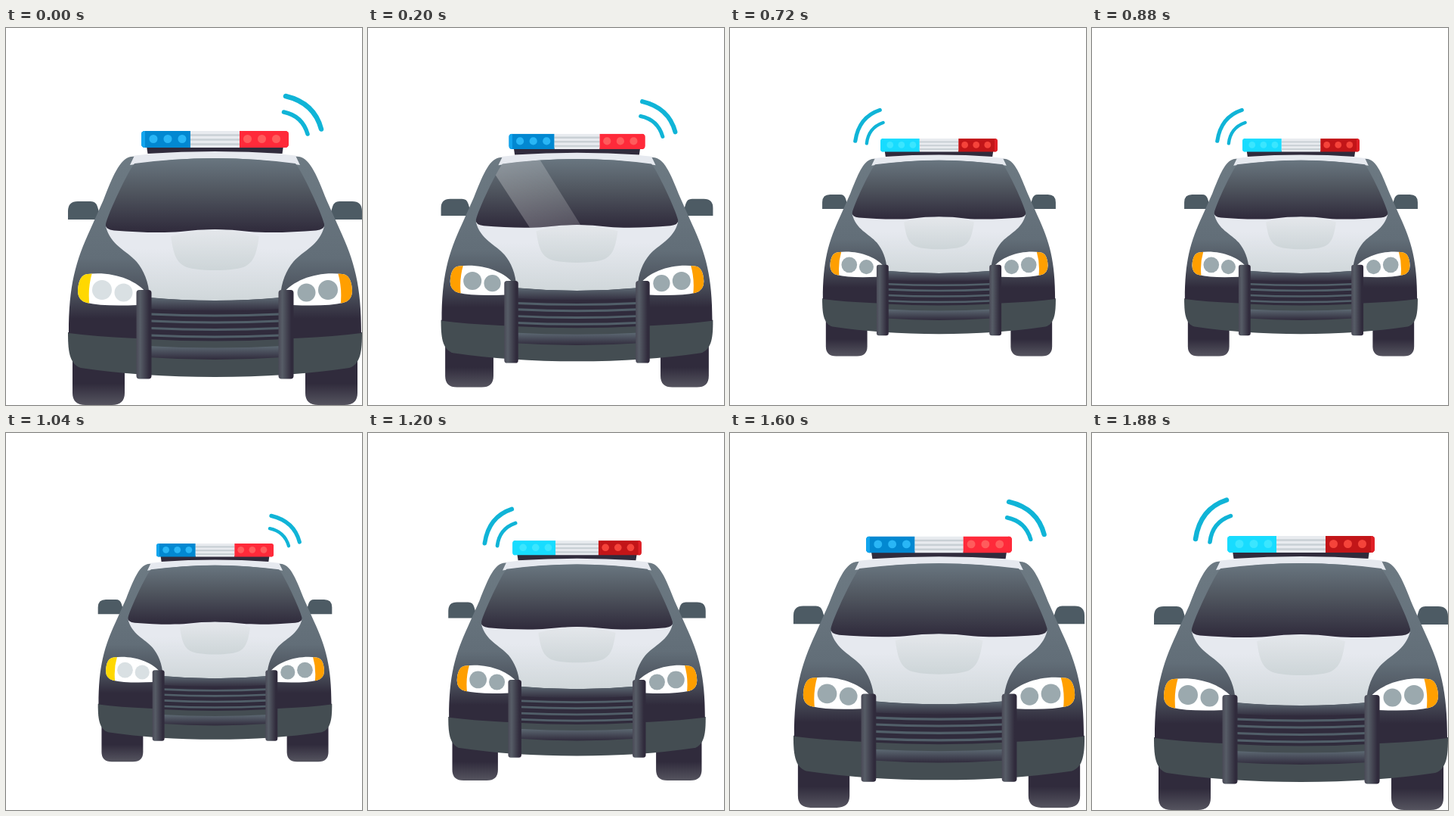
An HTML page for the animation above (1.92 s loop, 471 px wide and 498 px high).

```html
<!DOCTYPE html>
<html lang="en">
<head>
<meta charset="utf-8">
<title>Patrol car</title>
<style>
  html, body { margin: 0; width: 100%; height: 100%; overflow: hidden; background: #fff; }
  svg { display: block; width: 471px; height: 498px; }
</style>
</head>
<body>
<svg viewBox="0 0 471 498">
  <defs>
    <linearGradient id="body" gradientUnits="userSpaceOnUse" x1="0" y1="170" x2="0" y2="400">
      <stop offset="0" stop-color="#6d7a83"/><stop offset=".58" stop-color="#626e78"/>
      <stop offset=".78" stop-color="#4c525d"/><stop offset=".93" stop-color="#302b3c"/>
    </linearGradient>
    <linearGradient id="glass" x1="0" y1="0" x2="0" y2="1">
      <stop offset="0" stop-color="#697680"/><stop offset=".45" stop-color="#50565f"/><stop offset="1" stop-color="#2f2a3b"/>
    </linearGradient>
    <linearGradient id="hood" x1="0" y1="0" x2="0" y2="1">
      <stop offset=".3" stop-color="#e6e9ef"/><stop offset="1" stop-color="#d0d7da"/>
    </linearGradient>
    <linearGradient id="scoop" x1="0" y1="0" x2="0" y2="1">
      <stop offset="0" stop-color="#e4e7eb"/><stop offset="1" stop-color="#cdd5d8"/>
    </linearGradient>
    <linearGradient id="tire" x1="0" y1="0" x2="0" y2="1">
      <stop offset=".55" stop-color="#302b3c"/><stop offset="1" stop-color="#55545f"/>
    </linearGradient>
    <linearGradient id="post" x1="0" y1="0" x2="1" y2="0">
      <stop offset="0" stop-color="#4a4a57"/><stop offset=".25" stop-color="#575d67"/><stop offset=".85" stop-color="#302b3c"/>
    </linearGradient>
    <linearGradient id="lip" x1="0" y1="0" x2="0" y2="1">
      <stop offset="0" stop-color="#5d6973"/><stop offset="1" stop-color="#302b3c"/>
    </linearGradient>
    <linearGradient id="shine" x1="0" y1="0" x2="1" y2="0">
      <stop offset="0" stop-color="#fff" stop-opacity=".27"/><stop offset="1" stop-color="#fff" stop-opacity=".17"/>
    </linearGradient>
    <path id="screen" d="M170 179Q276.500 165 383 179C391 188 418 245 421 259Q422 266 410 267.500C380 270 345 271 322 269Q276.500 263 231 269C208 271 173 270 143 267.500Q131 266 132 259C135 245 162 188 170 179Z"/>
    <clipPath id="screenClip"><use href="#screen"/></clipPath>
    <clipPath id="barClip"><rect x="179" y="136" width="195" height="22" rx="4.500"/></clipPath>
    <path id="lampShape" d="M108 325C140 321 172 332 187 351Q189 366 174 366Q128 368 107 363Q95 360 95 347Q96 326 108 325Z"/>
    <clipPath id="lampClip"><use href="#lampShape"/></clipPath>
    <g id="wheel">
      <path fill="url(#tire)" d="M88 435H157V482Q157 498 140 498H105Q88 498 88 482Z"/>
      <path fill="#4d5b64" d="M82 253V242Q82 229 95 229H112Q119 229 121 236L124 246L119 253Z"/>
    </g>
  </defs>

  <g id="car">
    <use href="#wheel"/>
    <use href="#wheel" transform="translate(553) scale(-1 1)"/>
    <path fill="#444d52" d="M82 402C82 424 83 444 99 449Q180 461 276.500 461T454 449C470 444 471 424 471 402Z"/>
    <path fill="url(#body)" d="M165 170Q276.500 158 388 170C403 173 412 197 424 227L441 265C461 308 470 340 470 403Q400 412 276.500 412T83 403C83 340 92 308 112 265L129 227C141 197 150 173 165 170Z"/>
    <path fill="#e6e9ef" d="M170 168.500Q276.500 156 383 168.500L389 181Q276.500 163 164 181Z"/>
    <path fill="url(#hood)" d="M132 262Q136 266 145 266H408Q417 266 421 262C415 287 393 294 380 309C371 320 364 335 363 356Q276.500 364 190 356C189 335 182 320 173 309C160 294 138 287 132 262Z"/>
    <use href="#screen" fill="url(#glass)"/>
    <path fill="url(#scoop)" d="M218 275Q276.500 258 335 275C332 293 330 307 318 314C306 322 247 322 235 314C223 307 221 293 218 275Z"/>
    <g clip-path="url(#screenClip)">
      <path id="gleam" fill="url(#shine)" d="M141 166H219L284 270H209Z"/>
    </g>

    <path fill="url(#lip)" d="M187 356Q276.500 364 366 356V372Q276.500 377 187 372Z"/>
    <path fill="#302b3c" d="M187 371Q276.500 376 366 371V424Q276.500 428 187 424Z"/>
    <g id="slats" fill="none" stroke="#515f69" stroke-width="3.200"/>
    <path fill="#444d52" d="M187 411Q276.500 416 366 411V422Q276.500 426 187 422Z"/>
    <path fill="url(#lip)" d="M187 420Q276.500 425 366 420V435Q276.500 441 187 435Z"/>

    <g id="lampLeft"></g>
    <g id="lampRight" transform="translate(553) scale(-1 1)"></g>
    <rect x="172.500" y="346" width="20" height="117.500" rx="4" fill="url(#post)"/>
    <rect x="360.500" y="346" width="20" height="117.500" rx="4" fill="url(#post)"/>

    <path fill="#302b3c" d="M186 156H367L365.500 166Q276.500 160 187.500 166Z"/>
    <g clip-path="url(#barClip)">
      <rect x="244" y="136" width="65" height="23" fill="#e8ebef"/>
      <path d="M244 141.500H309M244 147.500H309M244 153.500H309" stroke="#c9d0d5" stroke-width="2.600"/>
      <g id="blue"></g>
      <g id="red"></g>
    </g>
    <g fill="none" stroke="#10b4d7" stroke-linecap="round">
      <g id="wavesLeft">
        <path stroke-width="6.500" d="M178 88.500Q143 100 137 140"/>
        <path stroke-width="5.500" d="M183.500 109.500Q159 118 156 144"/>
      </g>
      <g id="wavesRight">
        <path stroke-width="6.500" d="M370 90Q408 99 417 133.500"/>
        <path stroke-width="5.500" d="M367.500 111Q392 116 399 140"/>
      </g>
    </g>
  </g>
</svg>
<script>
const LOOP = 1920, STEP = 40, FLASH = 240;
const PIVOT = { x: 276.5, y: 185 };
const $ = id => document.getElementById(id);

// [time, scale] pairs, joined by a smooth monotone curve
const zoom = [[0, 1], [200, .925], [440, .823], [600, .797], [720, .794],
  [1000, .794], [1040, .796], [1120, .829], [1360, .957], [1680, .995], [1880, 1], [1920, 1]];

function slope(i) {
  if (i <= 0 || i >= zoom.length - 1) return 0;
  const rate = k => (zoom[k + 1][1] - zoom[k][1]) / (zoom[k + 1][0] - zoom[k][0]);
  const a = rate(i - 1), b = rate(i);
  return a * b > 0 ? 2 * a * b / (a + b) : 0;
}

function scaleAt(t) {
  const i = zoom.findIndex((p, k) => t >= p[0] && t < zoom[k + 1][0]);
  const [t0, s0] = zoom[i], [t1, s1] = zoom[i + 1];
  const h = t1 - t0, u = (t - t0) / h, v = 1 - u;
  return s0 * v * v * (1 + 2 * u) + s1 * u * u * (1 + 2 * v)
    + h * u * v * (slope(i) * v - slope(i + 1) * u);
}

$('slats').innerHTML = [378, 387, 396.5, 406]
  .map(y => `<path d="M191 ${y}Q276.500 ${y + 4} 362 ${y}"/>`).join('');

for (const id of ['lampLeft', 'lampRight']) {
  $(id).innerHTML = `<use href="#lampShape" fill="#fff"/>
    <path class="amber" clip-path="url(#lampClip)" d="M90 320H115Q107 344 111 370H90Z"/>
    <g class="bulbs"><circle cx="127" cy="346" r="13"/><circle cx="155.500" cy="349.500" r="12"/></g>`;
}

function buildBeacon(id, x, capX, dotX) {
  const dots = [0, 19, 38].map(d => `<circle cx="${dotX + d}" cy="146.500" r="5.500"/>`);
  $(id).innerHTML = `<rect class="base" x="${x}" y="136" width="65" height="23"/>
    <rect class="cap" x="${capX}" y="136" width="5" height="23"/><g class="dots">${dots.join('')}</g>`;
}
buildBeacon('blue', 179, 179, 195);
buildBeacon('red', 309, 369, 319.5);

function paint(id, colors) {
  for (const [part, color] of Object.entries(colors)) {
    $(id).querySelector('.' + part).setAttribute('fill', color);
  }
}

const show = (id, on) => $(id).setAttribute('visibility', on ? 'visible' : 'hidden');
const lamp = on => on ? { amber: '#ffd800', bulbs: '#d9e0e3' } : { amber: '#ff9f00', bulbs: '#9ba9ae' };

function draw(t) {
  const s = scaleAt(t);
  $('car').setAttribute('transform',
    `translate(${PIVOT.x} ${PIVOT.y}) scale(${s}) translate(${-PIVOT.x} ${-PIVOT.y})`);

  const redLit = Math.floor(t / FLASH) % 2 === 0;
  show('wavesRight', redLit);
  show('wavesLeft', !redLit);
  paint('blue', redLit
    ? { base: '#0288d1', cap: '#12a5ee', dots: '#29b6f6' }
    : { base: '#18dcff', cap: '#18dcff', dots: '#3be6ff' });
  paint('red', redLit
    ? { base: '#ff2a3a', cap: '#ff2a3a', dots: '#ff5c5c' }
    : { base: '#c21518', cap: '#e01f26', dots: '#f5433a' });

  const beat = t % 960;
  paint('lampLeft', lamp(beat < 120 || beat >= 440 && beat < 560));
  paint('lampRight', lamp(false));

  show('gleam', t >= 80 && t < 440);
  $('gleam').setAttribute('transform', `translate(${(t - 200) * 1.15})`);
}

const start = performance.now();
function tick() {
  const t = (performance.now() - start) % LOOP;
  draw(Math.floor(t / STEP) * STEP);
  requestAnimationFrame(tick);
}
tick();
</script>
</body>
</html>
```
